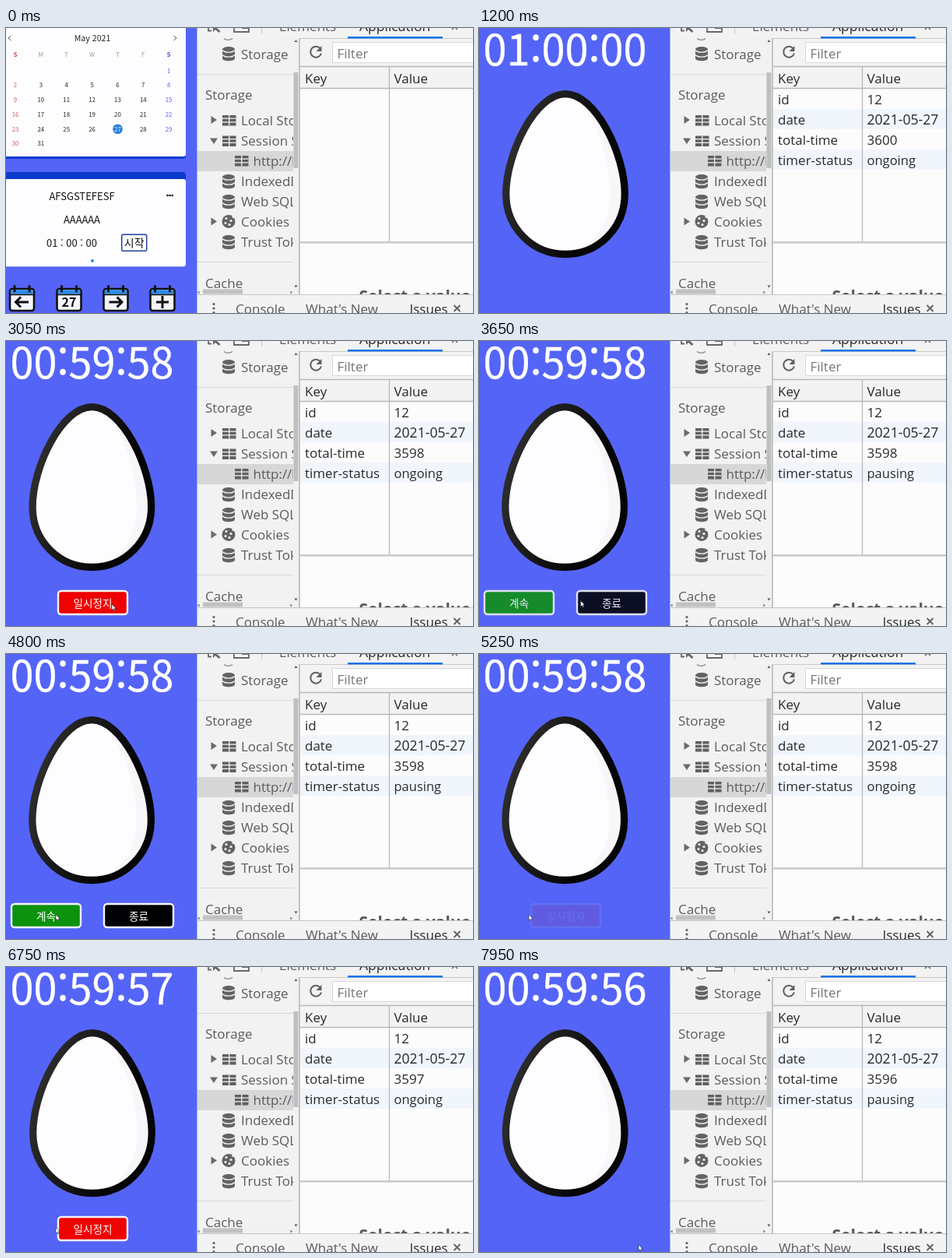
Animation, 600 px wide and 366 px high, one loop 8000 ms. Source, as an HTML page:

```html
<!DOCTYPE html>
<html lang="ko">
<head>
<meta charset="utf-8">
<title>Timer</title>
<style>
html, body { margin: 0; width: 100%; height: 100%; overflow: hidden; }
svg { display: block; width: 600px; height: 366px; }
.kr { font-family: "Noto Sans CJK KR", "Noto Sans CJK", "Noto Sans", sans-serif; font-feature-settings: "calt" 0, "ccmp" 0; }
.ui { font-family: "Open Sans", "Noto Sans", sans-serif; font-size: 17px; fill: #5a5b5e; }
.dark { fill: #28292b; }
</style>
</head>
<body>
<svg id="stage" viewBox="0 0 600 366"></svg>
<script>
const LOOP = 8000;
const START = 1000, PAUSE = 3060, RESUME = 4830, PAUSE2 = 7550;

const text = (x, y, s, attrs = '') => `<text x="${x}" y="${y}" ${attrs}>${s}</text>`;
const mid = (x, y, s, size, attrs = '') => text(x, y, s, `text-anchor="middle" font-size="${size}" ${attrs}`);
const rect = (x, y, w, h, fill, attrs = '') => `<rect x="${x}" y="${y}" width="${w}" height="${h}" fill="${fill}" ${attrs}/>`;
const path = (d, attrs) => `<path d="${d}" ${attrs}/>`;
const stroke = (color, w) => `fill="none" stroke="${color}" stroke-width="${w}"`;

// Month view: 1 May 2021 is a Saturday
function calendar() {
  const col = i => 12 + i * 32.85;
  let s = rect(-6, -10, 237, 178, '#0b3bcb', 'rx="4"') + rect(-6, -10, 237, 175, '#fdfdff', 'rx="3"');
  s += path('M6.5 10 L3 13 L6.5 16 M215.5 10 L219 13 L215.5 16', stroke('#555', 1));
  s += mid(111, 17, 'May 2021', 10.6, 'fill="#222"');
  [...'SMTWTFS'].forEach((d, i) => {
    s += mid(col(i), 37, d, 8, `font-weight="${i % 6 ? 400 : 700}" fill="${i == 0 ? '#d64545' : i == 6 ? '#4650e8' : '#999'}"`);
  });
  s += '<circle cx="143.5" cy="129.7" r="6.3" fill="#2580dc"/>';
  for (let d = 1; d <= 31; d++) {
    const i = (d + 5) % 7, row = (d + 5 - i) / 7;
    const fill = d == 27 ? '#fff' : i == 0 ? '#d05a5a' : i == 6 ? '#5a60ee' : '#222';
    s += mid(col(i), 57.7 + row * 18.75, d, 7.8, `fill="${fill}"`);
  }
  return s;
}

function taskCard() {
  return rect(-6, 185, 237, 122, '#0b3bcb', 'rx="4"') + rect(-6, 194, 237, 112.5, '#fdfdff', 'rx="3"') +
    mid(97.5, 221, 'AFSGSTEFESF', 13, 'fill="#111"') +
    mid(97.5, 250.5, 'AAAAAA', 13, 'fill="#111"') +
    mid(84.5, 281, '01 : 00 : 00', 13, 'fill="#111"') +
    [207.5, 210.6, 213.7].map(x => `<circle cx="${x}" cy="215" r="1.3" fill="#111"/>`).join('') +
    rect(148.7, 265.2, 32, 21, '#fff', 'rx="1.5" stroke="#203f9c" stroke-width="1.5"') +
    mid(164.7, 281, '시작', 14, 'fill="#111"') +
    '<circle cx="111" cy="299" r="2" fill="#2a8be0"/>';
}

function calIcon(x, mark) {
  return `<g transform="translate(${x} 331)">` +
    rect(-15.5, 4, 31, 28, '#f4f6fb', 'rx="3" stroke="#111" stroke-width="2.6"') +
    rect(-14.2, 5.3, 28.4, 5.5, '#2c8ce8') +
    path('M-15 11.5 H15', stroke('#111', 1.6)) +
    path('M-9.5 0.5 V7 M9.5 0.5 V7', stroke('#111', 3) + ' stroke-linecap="round"') + mark + '</g>';
}

function homePage() {
  const mark = d => path(d, stroke('#111', 3));
  return calendar() + taskCard() +
    calIcon(20.5, mark('M8.5 21 H-7 M-1.5 14.5 L-8 21 L-1.5 27.5')) +
    calIcon(81, mid(0, 26.5, '27', 16, 'font-weight="700" fill="#111"')) +
    calIcon(141, mark('M-8.5 21 H7 M1.5 14.5 L8 21 L1.5 27.5')) +
    calIcon(201, mark('M-8 21 H8 M0 13 V29'));
}

const button = (x, label, fill) =>
  rect(x, 321, 89, 30, fill, 'rx="4" stroke="#f4f4fc" stroke-width="2.4"') +
  mid(x + 44.5, 341.5, label, 13.6, 'font-weight="300" fill="#fff"');

function timerPage() {
  const egg = 'M111 84.7 C150 84.7 187.3 162 187.3 213 C187.3 257 153 290.5 111 290.5 C69 290.5 34.7 257 34.7 213 C34.7 162 72 84.7 111 84.7 Z';
  return text(5.5, 48, '', 'id="clock" font-size="54" fill="#fff" stroke="#fff" stroke-width=".4"') +
    '<g id="egg">' + path(egg, 'fill="#fdfcfe"') +
    path('M128 92 C160 118 183 175 183 213 C183 250 160 275 132 284 C162 262 173 235 167 190 C162 150 148 115 128 92 Z', 'fill="#f8f6f9"') +
    path(egg, stroke('url(#shell)', 9.3)) + '</g>' +
    `<g id="stop">${button(67, '일시정지', '#ee0202')}</g>` +
    `<g id="choice">${button(7, '계속', '#0d920d')}${button(126, '종료', '#020204')}</g>`;
}

const disk = y => `<g transform="translate(286 ${y})">` +
  path('M-8 -5.5 V6 C-8 10.3 8 10.3 8 6 V-5.5 C8 -10.3 -8 -10.3 -8 -5.5 Z', 'fill="#626365"') +
  path('M-8 -4.5 C-5 -1 5 -1 8 -4.5 M-8 1.5 C-5 5 5 5 8 1.5', stroke('#f2f2f2', 1.3)) + '</g>';

const grid = (x, y) => rect(x, y, 17.5, 13.5, '#5f6063') +
  path(`M${x} ${y + 4.2} h17.5 M${x} ${y + 8.9} h17.5 M${x + 8.75} ${y} v13.5`, stroke('#f2f2f2', 1.3));

const arrow = (x, y, open) => path(open ? `M${x - 5} ${y - 3.5} h10 l-5 7.5 z` : `M${x - 3.5} ${y - 5} v10 l7.5 -5 z`, 'fill="#6b6b6b"');

function sidebar() {
  let s = rect(246, 13, 131, 330, '#f2f2f2') + rect(246, 158, 123, 26, '#d7d7d7');
  s += path('M246 59.5 H369 M246 300.5 H369', stroke('#d8d8d8', 1));
  s += path('M280 13.5 C283 16 288 16 291 13.5', stroke('#888', 1.2));
  s += disk(33) + disk(197) + disk(223) + disk(275);
  s += grid(278, 112) + grid(278, 138.5) + grid(294, 164);
  s += arrow(267, 118) + arrow(267, 145, true) + arrow(267, 248.5);
  s += '<circle cx="286" cy="248.5" r="8.5" fill="#626365"/>' +
    [[-3, -4], [3, -1], [-4, 2], [1, 4], [6, -6]].map(([x, y]) => `<circle cx="${286 + x}" cy="${248.5 + y}" r="1.6" fill="#f2f2f2"/>`).join('');
  s += '<g clip-path="url(#side)">' + text(302, 40, 'Storage') + text(256, 92, 'Storage') + text(256, 333.5, 'Cache');
  ['Local Storage', 'Session Storage', 'http://localhost', 'IndexedDB', 'Web SQL', 'Cookies', 'Trust Tokens'].forEach((label, i) => {
    s += text(i == 2 ? 317.5 : 302, 125 + i * 26, label);
  });
  s += '</g>';
  s += rect(369, 13, 7.5, 330, '#f1f1f1') + rect(369.5, 57, 6, 123, '#bfbfbf');
  s += path('M370.5 330.5 h4 l-2 3 z M370.5 18 h4 l-2 -3 z', 'fill="#555"');
  s += rect(246, 335, 123, 8, '#f1f1f1') + rect(253, 335.5, 51, 6, '#c1c1c1');
  s += path('M248.5 337.5 v4 l-2.5 -2 z M365.5 337.5 v4 l2.5 -2 z', 'fill="#777"');
  return s;
}

function devtools() {
  const dark = 'class="dark"';
  let s = rect(245.5, 0, 355, 366, '#f3f3f3') + rect(377, 49, 223, 294, '#fcfcfd');
  s += path('M264 3.5 H260 V-4 M293 -3 V5 H312 V0 H303', stroke('#66686b', 1.8));
  s += path('M266 -6 V5 L269 2 L273.5 6 L275.5 4 L271 0 H274 Z', 'fill="#66686b"');
  s += path('M328.5 0 V7', stroke('#c4c4c4', 1));
  s += text(351, 4, 'Elements') + text(454, 4, 'Application', 'class="dark" font-size="17.5"');
  s += path('M573 -5 L580 2 M580 -5 L573 2', stroke('#666', 1.5));
  s += path('M245 13.5 H600', stroke('#cacaca', 1)) + rect(439, 11, 122, 2.5, '#1a73e8');
  s += sidebar();
  // Toolbar
  s += path('M403.5 26 A7 7 0 1 0 405 32.5', stroke('#5f6063', 2)) + path('M405.5 23 V30 H398.5 Z', 'fill="#5f6063"');
  s += rect(419.5, 18.5, 190, 26, '#fff', 'stroke="#d8d8d8"') + text(425.5, 39, 'Filter', 'fill="#757575"');
  // Table
  s += rect(378, 49, 222, 28, '#f3f3f3') + `<g id="rows">${rect(378, 104, 222, 26, '#f1f5fc')}${rect(378, 156, 222, 26, '#f1f5fc')}</g>`;
  s += path('M377 49.5 H600 M377 77.5 H600 M492.5 50 V274', stroke('#b8b8b8', 1.3)) + rect(377, 274, 223, 2.6, '#cbcbcb');
  s += path('M377 13 V343', stroke('#c4c4c4', 2));
  s += text(384, 70.5, 'Key', dark) + text(498.5, 70.5, 'Value', dark);
  s += '<g id="data">';
  const values = ['12', '2021-05-27', '', ''], sizes = [17, 17.6, 17, 16.5];
  ['id', 'date', 'total-time', 'timer-status'].forEach((key, i) => {
    const y = 97.5 + i * 26;
    s += text(384, y, key, dark) + text(498.5, y, values[i], `id="val${i}" class="dark" font-size="${sizes[i]}"`);
  });
  s += '</g><g clip-path="url(#main)">' + text(453.5, 352, 'Select a value to preview', 'font-weight="700" font-size="21"') + '</g>';
  // Drawer
  s += rect(246, 343, 354, 23, '#f3f3f3') + path('M246 342.5 H600', stroke('#c6c6c6', 1));
  s += [354.5, 360, 365.5].map(y => `<circle cx="267" cy="${y}" r="1.6" fill="#5f6063"/>`).join('');
  s += text(295, 367, 'Console') + text(385, 367, 'What\'s New') + text(518.5, 367, 'Issues', dark);
  return s + path('M575.5 356 L583.5 364 M583.5 356 L575.5 364', stroke('#5f6063', 1.8));
}

const $ = id => document.getElementById(id);
$('stage').innerHTML = `<defs>
  <clipPath id="side"><rect x="246" y="14" width="123" height="321"/></clipPath>
  <clipPath id="main"><rect x="378" y="277" width="222" height="65"/></clipPath>
  <clipPath id="app"><rect width="246" height="366"/></clipPath>
  <linearGradient id="shell" x1="0" y1="0.1" x2="1" y2="0.5"><stop offset="0" stop-color="#353334"/><stop offset="0.8" stop-color="#050505"/></linearGradient>
  </defs>${rect(0, 0, 246, 366, '#5464f6')}
  <g class="kr" clip-path="url(#app)"><g id="home">${homePage()}</g><g id="timer">${timerPage()}</g>
  <path id="cursor" d="M0 0 V7.5 L1.8 6 L3 8.5 L4.2 8 L3.1 5.5 H5.2 Z" fill="#fff" stroke="#222" stroke-width=".6"/></g>
  <g class="ui">${devtools()}</g>`;

const clamp = v => Math.max(0, Math.min(1, v));
const ramp = (t, from, len) => clamp((t - from) / len);
const ease = v => v * v * (3 - 2 * v);
const show = (id, on) => $(id).setAttribute('visibility', on ? 'visible' : 'hidden');
const fade = (id, v) => $(id).setAttribute('opacity', clamp(v));

// Pointer stops: time, x, y
const stops = [[150, 200, 368], [750, 166, 278], [1000, 166, 278], [2450, 166, 368], [2900, 136, 338], [3080, 136, 338],
  [3600, 130.5, 333.5], [3950, 130.5, 333.5], [4600, 64, 334.5], [6950, 64, 334.5], [7350, 130, 338], [7600, 130, 338], [7900, 205, 356.5]];

function pointer(t) {
  const i = stops.findLastIndex(s => s[0] <= t);
  if (i < 0) return [-20, -20];
  const a = stops[i], b = stops[i + 1] || a;
  const k = ease(ramp(t, a[0], b[0] - a[0] || 1));
  return [a[1] + (b[1] - a[1]) * k, a[2] + (b[2] - a[2]) * k];
}

// Seconds counted down; the tick restarts on resume
function remaining(t) {
  const ticks = (from, to) => Math.max(0, Math.floor((Math.min(t, to) - from) / 1000));
  return 3600 - ticks(START, PAUSE) - ticks(RESUME, PAUSE2);
}

function render(t) {
  const started = t >= START;
  const paused = (t >= PAUSE && t < RESUME) || t >= PAUSE2;
  show('home', !started);
  ['timer', 'rows', 'data'].forEach(id => show(id, started));

  const left = remaining(t);
  const two = n => String(n).padStart(2, '0');
  $('clock').textContent = [Math.floor(left / 3600), Math.floor(left / 60) % 60, left % 60].map(two).join(':');
  $('val2').textContent = left;
  $('val3').textContent = paused ? 'pausing' : 'ongoing';

  // Each button set fades out before the next fades in
  const stopFade = (from, to) => ramp(t, from + 400, 250) - ramp(t, to, 300);
  fade('stop', stopFade(START, PAUSE) + stopFade(RESUME, PAUSE2));
  fade('choice', ramp(t, PAUSE + 400, 220) - ramp(t, RESUME, 300));

  const sway = -0.5 - 0.5 * Math.cos((t - 4225) / 5500 * 2 * Math.PI);
  $('egg').setAttribute('transform', `translate(${sway.toFixed(2)} 0)`);

  const [x, y] = pointer(t);
  show('cursor', t < START || t > 2450);
  $('cursor').setAttribute('transform', `translate(${x.toFixed(1)} ${y.toFixed(1)})`);
}

const begin = performance.now();
function loop() {
  render((performance.now() - begin) % LOOP);
  requestAnimationFrame(loop);
}
loop();
</script>
</body>
</html>
```
